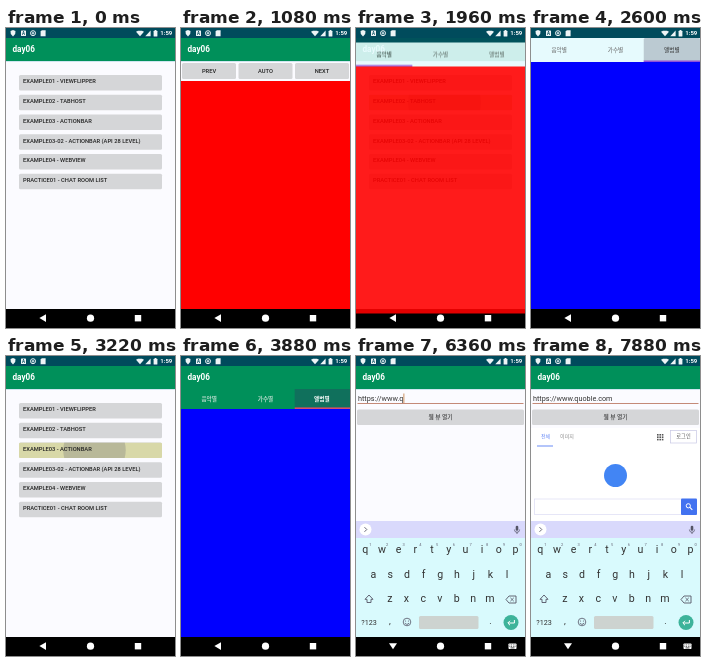
These frames come from a looping animation (169x300 px, 8 s). An HTML page with a canvas:

```html
<!DOCTYPE html>
<html lang="ko">
<head>
<meta charset="utf-8">
<title>day06</title>
<style>
  html, body { margin: 0; width: 100%; height: 100%; overflow: hidden; background: #000; }
  canvas { display: block; width: 169px; height: 300px; }
</style>
</head>
<body>
<canvas id="stage"></canvas>
<script>
const W = 169, H = 300, LOOP = 8000, OPEN = 140, NAV = 281;
const FONT = 'Roboto, "Noto Sans CJK KR", sans-serif';
const BAR = '#00905a', STATUS = '#004b5c', PAPER = '#fbfbff', GREY = '#d5d6d8';
const COLORS = ['#f00', '#0f0', '#00f'];
const TABS = ['음악별', '가수별', '앨범별'];
const ITEMS = ['EXAMPLE01 - VIEWFLIPPER', 'EXAMPLE02 - TABHOST', 'EXAMPLE03 - ACTIONBAR',
  'EXAMPLE03-02 - ACTIONBAR (API 28 LEVEL)', 'EXAMPLE04 - WEBVIEW', 'PRACTICE01 - CHAT ROOM LIST'];
const ADDRESS = 'https://www.quoble.com';
const TYPING = [[5020, 5260, 5], [5940, 6140, 12], [6360, 6840, 21], [7080, 7100, 22]];
const VISITS = [
  { draw: flipper, item: 0, press: 20, open: 130, close: 1480, end: 1640 },
  { draw: tabHost, item: 1, press: 1820, open: 1900, close: 2640, end: 2820 },
  { draw: actionTabs, item: 2, press: 3100, open: 3220, close: 3885, end: 4020 },
  { draw: web, item: 4, press: 4280, open: 4400, close: LOOP, end: LOOP + 1 }
];

const ratio = window.devicePixelRatio || 1;
function context(canvas) {
  canvas.width = W * ratio;
  canvas.height = H * ratio;
  const c = canvas.getContext('2d');
  c.scale(ratio, ratio);
  return c;
}
const stage = context(document.getElementById('stage'));
const layer = context(document.createElement('canvas'));
let g = stage;

const clamp = v => Math.max(0, Math.min(1, v));
const span = (t, a, b) => clamp((t - a) / (b - a));
const lastPassed = (t, times) => times.filter(s => t >= s).length;

function rect(x, y, w, h, color) {
  g.fillStyle = color;
  g.fillRect(x, y, w, h);
}
function round(x, y, w, h, r, color) {
  g.fillStyle = color;
  g.beginPath();
  g.roundRect(x, y, w, h, r);
  g.fill();
}
function disc(x, y, r, color) {
  g.fillStyle = color;
  g.beginPath();
  g.arc(x, y, r, 0, 7);
  g.fill();
}
function ring(x, y, r, color, width = 0.8) {
  g.strokeStyle = color;
  g.lineWidth = width;
  g.beginPath();
  g.arc(x, y, r, 0, 7);
  g.stroke();
}
function trace(points) {
  g.beginPath();
  points.forEach(([x, y]) => g.lineTo(x, y));
}
function poly(color, ...points) {
  trace(points);
  g.fillStyle = color;
  g.fill();
}
function line(color, width, ...points) {
  trace(points);
  g.strokeStyle = color;
  g.lineWidth = width;
  g.stroke();
}
function text(s, x, y, size, color, align = 'center', weight = 400) {
  g.font = `${weight} ${size}px ${FONT}`;
  g.textAlign = align;
  g.textBaseline = 'middle';
  g.fillStyle = color;
  g.fillText(s, x, y);
}

// Touch feedback; age is the time since the finger went down
function ripple(x, y, w, h, age, tint) {
  if (age < 0 || age > 300) return;
  g.save();
  g.beginPath();
  g.roundRect(x, y, w, h, 1.5);
  g.clip();
  g.globalAlpha = 1 - span(age, 200, 300);
  rect(x, y, w, h, tint);
  disc(x + w / 2 + 4, y + h / 2, age * 0.26, 'rgba(90,90,110,.25)');
  g.restore();
}
function button(x, y, w, h, age) {
  round(x, y, w, h, 1.5, GREY);
  ripple(x, y, w, h, age, '#d8d8a8');
}

function base(color = PAPER) {
  rect(0, 0, W, H, color);
  rect(0, 0, W, 10, STATUS);
  rect(0, NAV, W, H - NAV, '#000');
}
function titleBar() {
  rect(0, 10, W, 23, BAR);
  rect(0, 33, W, 1, '#cfe6f0');
  text('day06', 6.5, 21.8, 8.2, '#fff', 'left', 700);
}

function menu(t) {
  base();
  titleBar();
  ITEMS.forEach((label, i) => {
    const y = 47 + i * 19.75;
    const visit = VISITS.find(v => v.item === i && t >= v.press && t < v.open + OPEN);
    button(13, y, 143, 15.5, visit ? t - visit.press : -1);
    text(label, 17, y + 6.6, 5.75, '#222', 'left', 500);
  });
}

function flipper(t) {
  base();
  titleBar();
  const presses = { PREV: [], AUTO: [1100], NEXT: [340, 500, 660] };
  Object.entries(presses).forEach(([label, times], i) => {
    const x = 1 + i * 56.5;
    const down = times.filter(s => s <= t).pop() ?? Infinity;
    button(x, 35, 54, 16, t - down);
    text(label, x + 27, 43.2, 5.75, '#222', 'center', 500);
  });
  const view = lastPassed(t, [380, 540, 700, 1220, 1360]) % 3;
  rect(0, 53, W, NAV - 53, COLORS[view]);
}

function tabHost(t) {
  base('#e6fafd');
  const active = lastPassed(t, [2220, 2420]);
  TABS.forEach((label, i) => {
    const x = i * W / 3;
    ripple(x, 10, W / 3, 24, t - [9e9, 2180, 2380][i], '#cfe2e8');
    text(label, x + W / 6, 22.3, 5.6, i === active ? '#333' : '#666', 'center', 500);
  });
  rect(active * W / 3, 32.5, W / 3, 1.5, '#9050d8');
  rect(0, 34, W, NAV - 34, COLORS[active]);
}

function actionTabs(t) {
  base();
  titleBar();
  rect(0, 33, W, 20, BAR);
  const active = lastPassed(t, [3560, 3800]);
  TABS.forEach((label, i) => {
    const x = i * W / 3;
    const age = t - [9e9, 3500, 3740][i];
    if (age >= 0 && age < 200) rect(x + 1, 33, W / 3 - 1, 20, '#10705c');
    text(label, x + W / 6, 43.2, 5.6, i === active ? '#fff' : '#b0d8c8', 'center', 700);
  });
  rect(active * W / 3 + 1, 51.4, W / 3 - 1, 1.6, '#d0506a');
  rect(0, 53, W, NAV - 53, COLORS[active]);
}

function typedCount(t) {
  let count = 0;
  for (const [from, to, total] of TYPING)
    if (t >= from) count += Math.ceil((total - count) * clamp((t - from + 20) / (to - from + 20)));
  return count;
}

function web(t) {
  base();
  titleBar();
  const typed = typedCount(t);
  const address = ADDRESS.slice(0, typed);
  text(address, 2, 42.6, 7.25, '#333', 'left');
  if (t < 7540) rect(2 + g.measureText(address).width, 37.5, 0.9, 9.5, '#c88850');
  rect(1.5, 47, 166, 1, '#c48a78');
  button(1, 53.5, 167, 15.5, t - 7220);
  text('웹 뷰 열기', 84.5, 61, 5.75, '#222', 'center', 500);
  if (t >= 7840) page(t >= 7880);
  const shown = span(t, 4630, 4880);
  if (shown > 0) keyboard(shown, typed);
}

function page(complete) {
  const blue = '#6a8cf6';
  rect(0, 72, W, 93, '#fff');
  text('전체', 14.5, 80.5, 5, blue);
  text('이미지', 36, 80.5, 5, '#888');
  rect(6, 89.5, 16, 1, blue);
  for (let i = 0; i < 9; i++) rect(126 + i % 3 * 2.4, 78 + Math.floor(i / 3) * 2.4, 1.6, 1.6, '#555');
  g.strokeStyle = '#c8c8e4';
  g.lineWidth = 0.7;
  g.strokeRect(139.5, 74.5, 26, 12.5);
  text('로그인', 152.5, 80.7, 5.2, '#555');
  if (!complete) return;
  disc(84.5, 119.5, 11.5, '#4285f4');
  g.strokeStyle = '#dcdcf4';
  g.strokeRect(3.5, 143, 147, 15.5);
  round(150, 142.5, 16, 16.5, 1, '#4272f0');
  ring(157.3, 149.8, 2.1, '#fff', 1);
  line('#fff', 1.1, [158.9, 151.4], [161.3, 153.8]);
}

// Slides up and fades in together with its own strip of navigation bar
function keyboard(shown, typed) {
  const ink = '#333', thin = '#556';
  g.save();
  g.globalAlpha = shown;
  g.translate(0, 116 * (1 - shown) ** 2);
  rect(0, 165, W, 116, '#d9fafd');
  rect(0, NAV, W, H - NAV, '#000');
  rect(0, 165, W, 17, typed ? '#d9d9fc' : '#c8e4f6');
  disc(9.5, 173.5, 6, '#fff');
  line(thin, 0.9, [8.5, 171.2], [10.8, 173.5], [8.5, 175.8]);
  if (!typed) {
    ['and', 'I', 'thanks'].forEach((word, i) => text(word, 37 + i * 46.7, 174, 7, '#667'));
    [60, 108].forEach(x => rect(x, 170, 0.6, 8, '#b8c8d8'));
  }
  round(159.7, 169.8, 2.6, 5, 1.3, thin);
  line(thin, 0.7, [158.4, 173.5], [159, 175.6], [161, 176.3], [163, 175.6], [163.6, 173.5]);
  rect(160.6, 176, 0.8, 2, thin);

  const rows = [['qwertyuiop', 9.2, 194], ['asdfghjkl', 17.5, 218.5], ['zxcvbnm', 33.8, 243]];
  for (const [keys, x, y] of rows)
    [...keys].forEach((key, i) => text(key, x + i * 16.7, y, 10.6, ink));
  [...'1234567890'].forEach((key, i) => text(key, 14.3 + i * 16.7, 188.5, 4, '#667'));

  line(thin, 0.9, [13, 239], [17, 243.3], [15, 243.3], [15, 246.5], [11, 246.5], [11, 243.3], [9, 243.3], [13, 239]);
  line(thin, 0.9, [150, 243.5], [153, 240], [160, 240], [160, 247], [153, 247], [150, 243.5]);
  line(thin, 0.8, [154.4, 241.8], [157.8, 245.2]);
  line(thin, 0.8, [157.8, 241.8], [154.4, 245.2]);

  text('?123', 13, 266.7, 7.2, ink);
  text(',', 34, 265.5, 9, ink);
  ring(51, 266, 3.8, thin);
  disc(49.6, 265, 0.55, thin);
  disc(52.4, 265, 0.55, thin);
  g.beginPath();
  g.arc(51, 266.3, 2, 0.3, 2.84);
  g.stroke();
  round(63, 260, 59.5, 13, 1.5, typed ? '#cdd3d0' : '#c4cbf6');
  text('.', 134.5, 265.5, 9, ink);
  disc(155, 266.5, 7.5, '#3db39a');
  line('#fff', 1, [158.4, 264], [158.4, 267], [152, 267]);
  line('#fff', 1, [154, 264.8], [151.8, 267], [154, 269.2]);
  g.restore();
}

function statusIcons() {
  const ink = '#eef4f6';
  poly(ink, [4.5, 3], [7, 2], [9.5, 3], [9.2, 6], [7, 8.4], [4.8, 6]);
  round(15, 2.5, 5, 5.5, 0.6, ink);
  text('A', 17.5, 5.5, 4.5, STATUS, 'center', 700);
  ring(27, 5.2, 2.5, ink, 1);
  disc(27, 5.2, 1.2, '#b8d0d8');
  poly(ink, [35.8, 2.2], [39.6, 2.2], [39.6, 8.2], [34.6, 8.2], [34.6, 3.5]);
  poly(ink, [130, 3.8], [132, 2.7], [136, 2.7], [138, 3.8], [134, 8.3]);
  poly(ink, [139.3, 8.2], [144.6, 8.2], [144.6, 2.6]);
  rect(148.7, 2, 1.6, 1, ink);
  round(147.6, 2.7, 3.8, 5.7, 0.5, ink);
  text('1:59', 166.3, 5.6, 6, '#fff', 'right', 700);
}
function navIcons(typing) {
  if (typing) {
    poly('#fff', [33, 287.3], [41, 287.3], [37, 293.3]);
    round(152.5, 287.5, 8, 5.5, 0.7, '#fff');
    for (let i = 0; i < 8; i++) rect(153.5 + i % 4 * 1.7, 288.6 + (i > 3 ? 1.5 : 0), 0.8, 0.7, '#000');
    rect(154.5, 291.6, 4, 0.7, '#000');
  } else {
    poly('#fff', [40, 286.3], [40, 294], [33.4, 290.1]);
  }
  disc(84.5, 290.2, 3.6, '#fff');
  rect(128.8, 287, 6.4, 6.4, '#fff');
}

function render(t) {
  g = stage;
  menu(t);
  const visit = VISITS.find(v => t > v.open && t < v.end);
  if (visit) {
    const enter = span(t, visit.open, visit.open + OPEN);
    const leave = span(t, visit.close, visit.end);
    g = layer;
    visit.draw(t);
    g = stage;
    g.globalAlpha = (1 - (1 - enter) ** 4) * (1 - leave);
    g.drawImage(layer.canvas, 0, 24 * ((1 - enter) ** 3 + leave ** 2), W, H);
    g.globalAlpha = 1;
  }
  statusIcons();
  navIcons(t >= 4630);
}

const start = performance.now();
function tick() {
  const t = (performance.now() - start) % LOOP;
  render(Math.floor(t / 20) * 20);
  requestAnimationFrame(tick);
}
tick();
</script>
</body>
</html>
```
